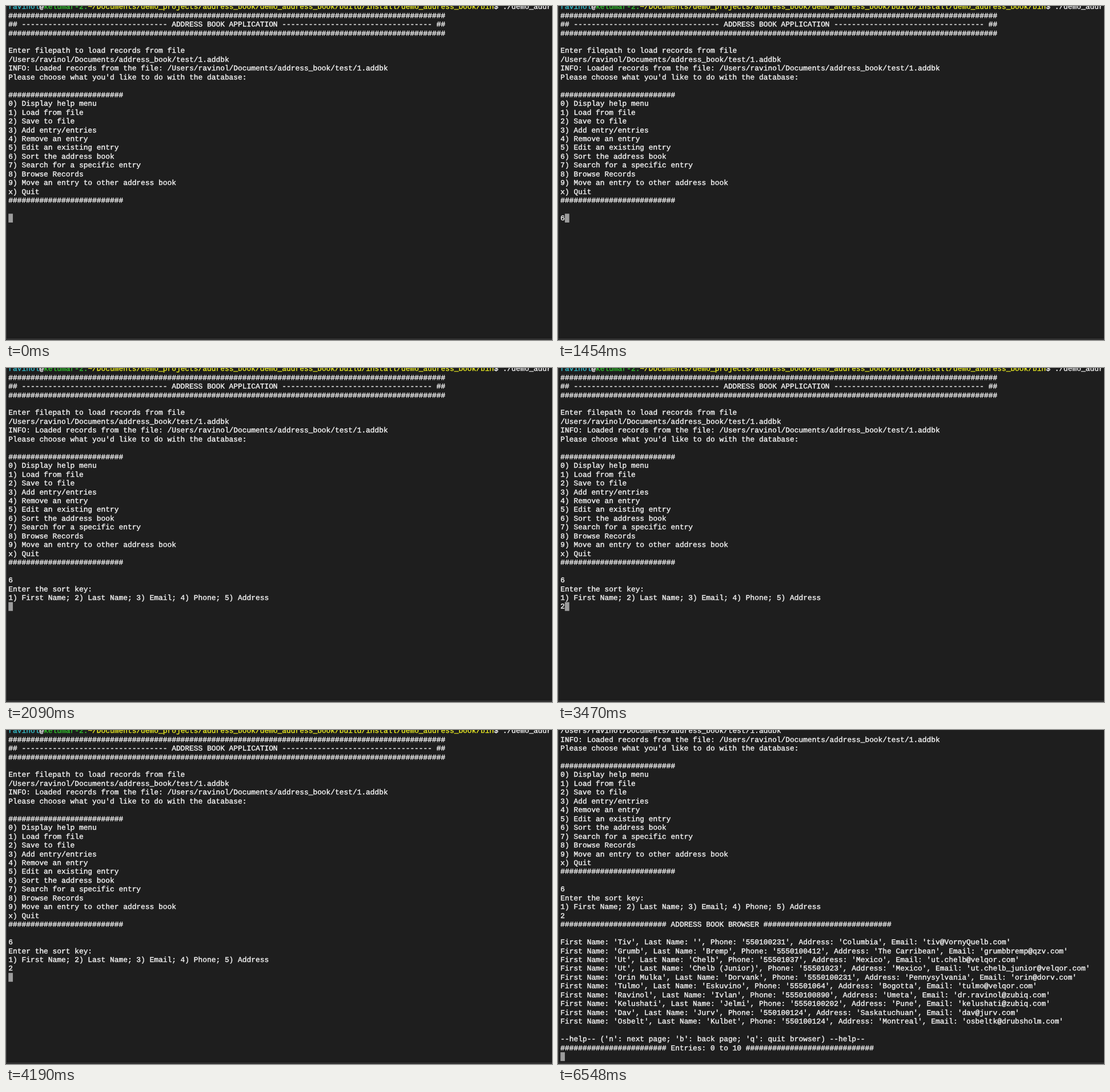
Write an HTML page that moves like this. It is 956 px wide and 586 px high and loops after 8 s.

```html
<!DOCTYPE html>
<html lang="en">
<head>
<meta charset="utf-8">
<title>Terminal address book</title>
<style>
  html, body { margin: 0; width: 100%; height: 100%; overflow: hidden; background: #1e1e1e; }
  svg { display: block; }
  text {
    font: 12.88px "Liberation Mono", "Courier New", monospace;
    color: #f2f2f2;
    white-space: pre;
    text-rendering: geometricPrecision;
  }
  text, tspan { fill: currentColor; stroke: currentColor; stroke-width: .42px; }
  .user { color: #33bbc8; }
  .host { color: #31c22d; }
  .path { color: #eaec23; }
</style>
</head>
<body>
<svg id="stage" width="956" height="586" viewBox="0 0 956 586">
  <rect width="956" height="586" fill="#1e1e1e"/>
  <rect id="cursor" fill="#9c9c9c"/>
  <g id="rows"></g>
  <rect width="1" height="584" fill="#424242"/>
  <rect y="584" width="956" height="1" fill="#4c4c4c"/>
</svg>
<script>
const NS = "http://www.w3.org/2000/svg";
const LEFT = 4.3, CELL = 7.73, PITCH = 15.455;
const BASE = 5.2, TOP = -6.5, LOOP = 8000;

const hash = n => "#".repeat(n);
const dash = n => "-".repeat(n);
const file = "/Users/ravinol/Documents/address_book/test/1.addbk";

const prompt = [
  ["user", "ravinol"],
  ["", "@"],
  ["host", "kelumar-2:"],
  ["path", "~/Documents/demo_projects/address_book/demo_address_book/build/install/demo_address_book/bin"],
  ["", "$ ./demo_addr"]
];

const menu = [
  "Display help menu", "Load from file", "Save to file", "Add entry/entries",
  "Remove an entry", "Edit an existing entry", "Sort the address book",
  "Search for a specific entry", "Browse Records",
  "Move an entry to other address book"
].map((label, i) => `${i}) ${label}`);

const fields = ["First Name", "Last Name", "Phone", "Address", "Email"];
const records = [
  ["Tiv", "", "550100231", "Columbia", "tiv@VornyQuelb.com"],
  ["Grumb", "Bremp", "5550100412", "The Carribean", "grumbbremp@qzv.com"],
  ["Ut", "Chelb", "55501037", "Mexico", "ut.chelb@velqor.com"],
  ["Ut", "Chelb (Junior)", "55501023", "Mexico", "ut.chelb_junior@velqor.com"],
  ["Orin Mulka", "Dorvank", "5550100231", "Pennysylvania", "orin@dorv.com"],
  ["Tulmo", "Eskuvino", "55501064", "Bogotta", "tulmo@velqor.com"],
  ["Ravinol", "Ivlan", "5550100890", "Umeta", "dr.ravinol@zubiq.com"],
  ["Kelushati", "Jelmi", "5550100202", "Pune", "kelushati@zubiq.com"],
  ["Dav", "Jurv", "550100124", "Saskatuchuan", "dav@jurv.com"],
  ["Osbelt", "Kulbet", "550100124", "Montreal", "osbeltk@drubsholm.com"]
].map(r => r.map((v, i) => `${fields[i]}: '${v}'`).join(", "));

const lines = [
  prompt,
  hash(99),
  `## ${dash(33)} ADDRESS BOOK APPLICATION ${dash(34)} ##`,
  hash(99),
  "",
  "Enter filepath to load records from file",
  file,
  `INFO: Loaded records from the file: ${file}`,
  "Please choose what you'd like to do with the database:",
  "",
  hash(26),
  ...menu,
  "x) Quit",
  hash(26),
  "",
  "6",
  "Enter the sort key:",
  "1) First Name; 2) Last Name; 3) Email; 4) Phone; 5) Address",
  "2",
  `${hash(24)} ADDRESS BOOK BROWSER ${hash(29)}`,
  "",
  ...records,
  "",
  "--help-- ('n': next page; 'b': back page; 'q': quit browser) --help--",
  `${hash(24)} Entries: 0 to 10 ${hash(29)}`
];

// Each step: start time, lines printed, cursor row and column, rows scrolled away
const steps = [
  { at: 0,    shown: 24, row: 24, col: 0, scroll: 0 },
  { at: 500,  shown: 25, row: 24, col: 1, scroll: 0 },
  { at: 2090, shown: 27, row: 27, col: 0, scroll: 0 },
  { at: 3470, shown: 28, row: 27, col: 1, scroll: 0 },
  { at: 4190, shown: 28, row: 28, col: 0, scroll: 0 },
  { at: 4370, shown: lines.length, row: lines.length, col: 0, scroll: 6 }
];

const rows = document.getElementById("rows");
const cursor = document.getElementById("cursor");

function set(el, attrs) {
  for (const k in attrs) el.setAttribute(k, attrs[k]);
}

const texts = lines.map((line, i) => {
  const el = document.createElementNS(NS, "text");
  set(el, { x: LEFT, y: i * PITCH + BASE });
  if (typeof line === "string") el.textContent = line;
  else for (const [name, part] of line) {
    const span = document.createElementNS(NS, "tspan");
    if (name) span.setAttribute("class", name);
    span.textContent = part;
    el.append(span);
  }
  rows.append(el);
  return el;
});

function draw(t) {
  const step = steps.filter(s => s.at <= t).pop();
  texts.forEach((el, i) => {
    const on = i >= step.scroll && i < step.shown;
    el.setAttribute("visibility", on ? "visible" : "hidden");
  });
  rows.setAttribute("transform", `translate(0 ${-step.scroll * PITCH})`);
  set(cursor, {
    x: LEFT + step.col * CELL,
    y: (step.row - step.scroll) * PITCH + TOP,
    width: CELL,
    height: PITCH
  });
}

const start = performance.now();
function tick() {
  draw((performance.now() - start) % LOOP);
  requestAnimationFrame(tick);
}
tick();
</script>
</body>
</html>
```
